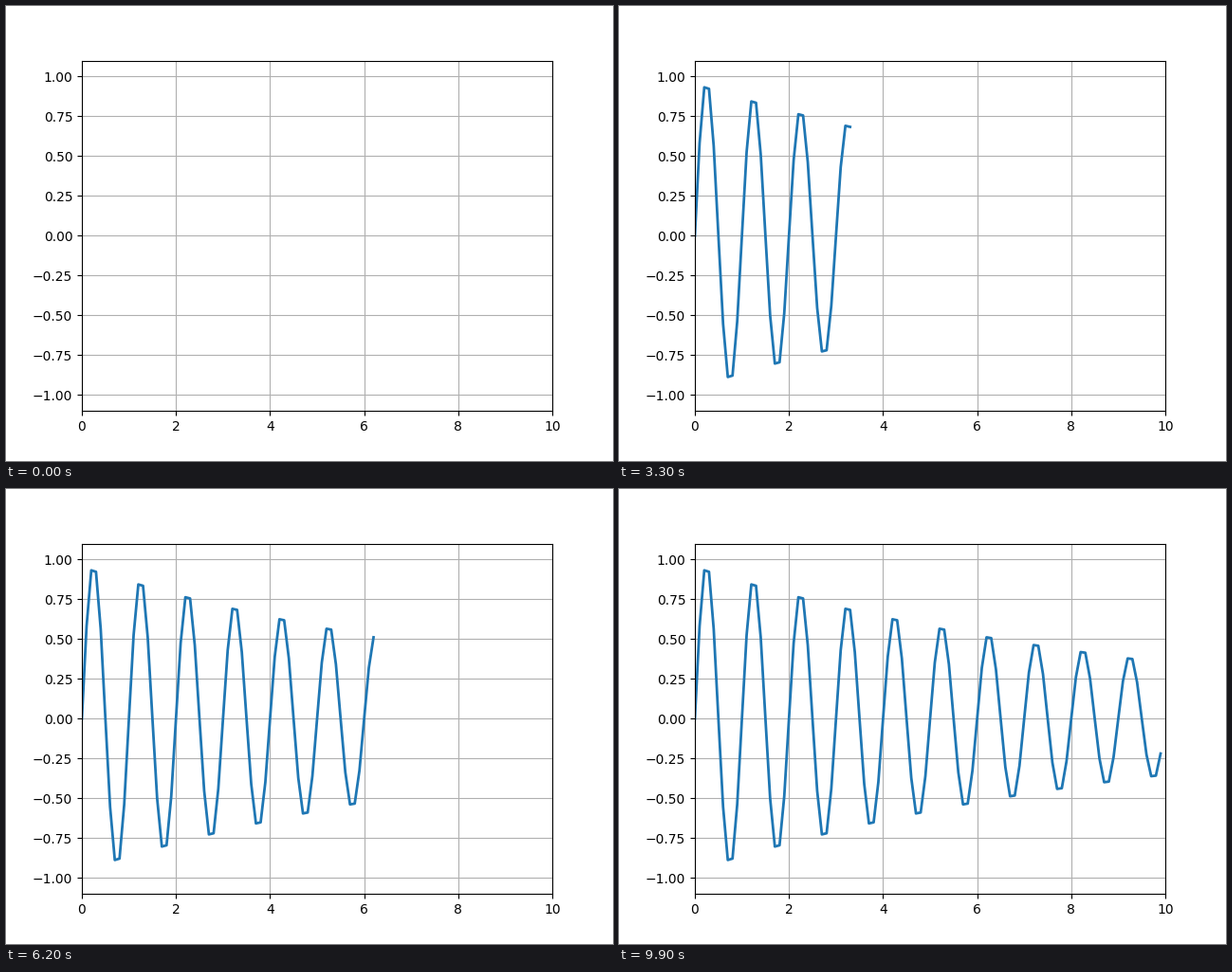
These frames come from a looping animation (640 by 480 pixels, 10 s). A matplotlib script:

```python
import numpy as np
import matplotlib.pyplot as plt
from matplotlib.animation import FuncAnimation

FRAMES = 100
INTERVAL = 100  # ms

t = np.arange(FRAMES) / 10
y = np.sin(2 * np.pi * t) * np.exp(-t / 10)

fig, ax = plt.subplots(figsize=(6.4, 4.8), dpi=100)
line, = ax.plot([], [], lw=2)
ax.set_xlim(0, 10)
ax.set_ylim(-1.1, 1.1)
ax.grid()


def init():
    line.set_data([], [])
    return line,


def update(i):
    """Reveal the damped wave one sample at a time."""
    line.set_data(t[:i + 1], y[:i + 1])
    return line,


anim = FuncAnimation(fig, update, frames=FRAMES, init_func=init,
                     interval=INTERVAL, repeat=True, repeat_delay=0)
plt.show()
```
